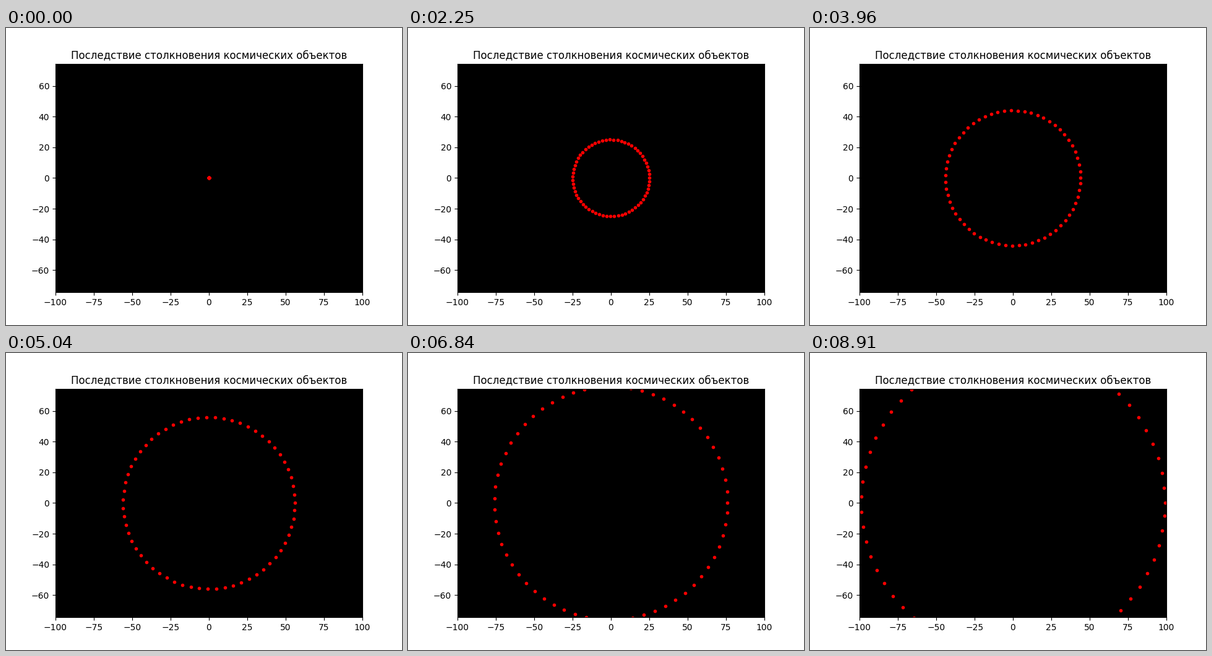
Animation, 640 px wide and 480 px high, one loop 9 s. Source, as a matplotlib script:

```python
import matplotlib.pyplot as plt
import numpy as np
from matplotlib.animation import FuncAnimation

FRAMES = 100
INTERVAL = 90
HALF_WIDTH = 100

plt.rcParams["font.family"] = "DejaVu Sans"

fig, ax = plt.subplots(figsize=(6.4, 4.8), dpi=100)
ax.set_facecolor("black")
ax.set_title("Последствие столкновения космических объектов")

# Equal scale on both axes: the height follows from the shape of the axes box.
box = ax.get_window_extent()
half_height = HALF_WIDTH * box.height / box.width
ax.set_xlim(-HALF_WIDTH, HALF_WIDTH)
ax.set_ylim(-half_height, half_height)

angles = np.arange(0, 2 * np.pi, 0.1)
debris, = ax.plot([], [], "o", color="red", ms=3)


def update(radius):
    debris.set_data(radius * np.cos(angles), radius * np.sin(angles))
    return debris,


anim = FuncAnimation(fig, update, frames=FRAMES, interval=INTERVAL,
                     repeat=True, repeat_delay=0)
plt.show()
```
